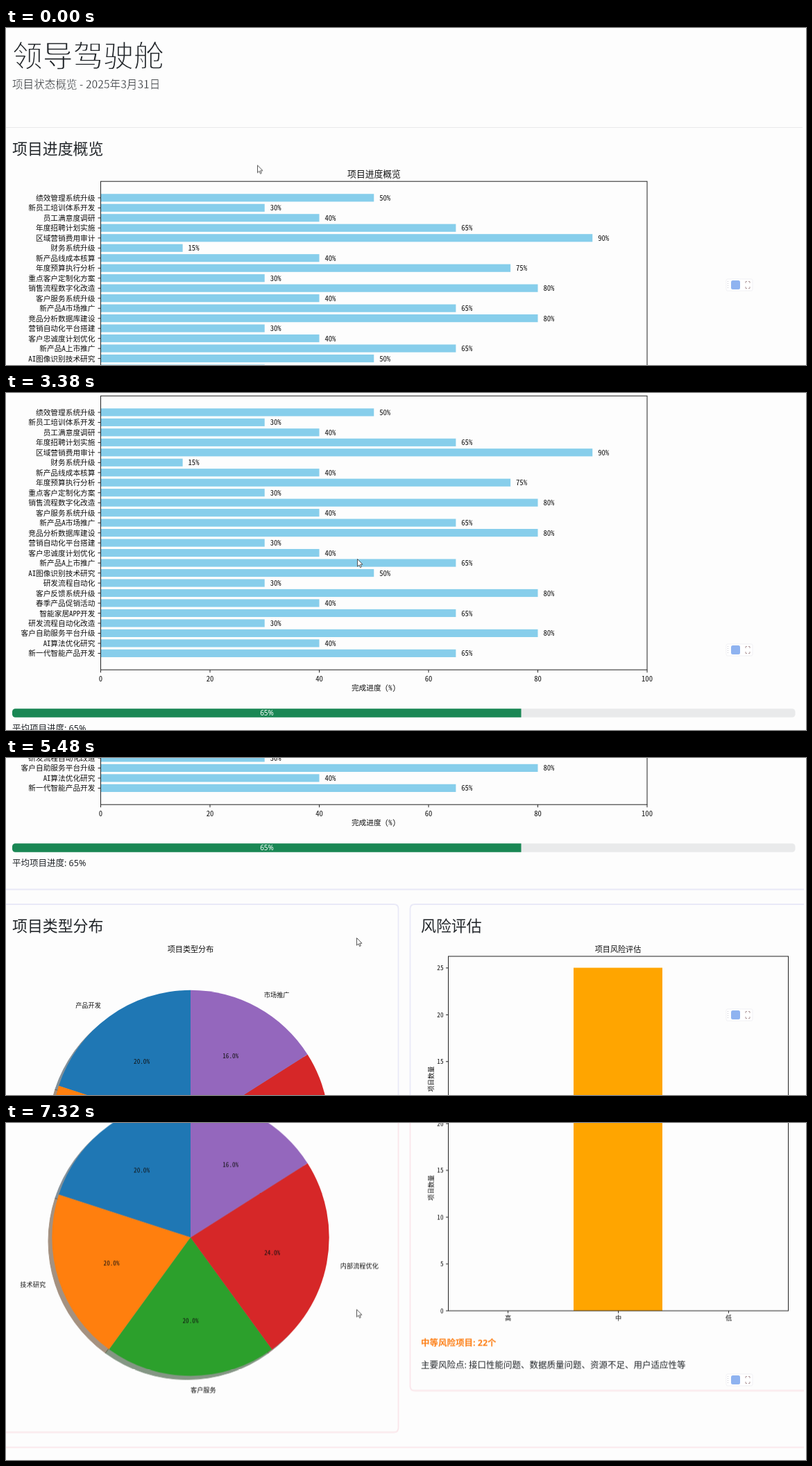
An HTML page for the animation above (8000 ms loop, 1153 by 486 pixels).

```html
<!DOCTYPE html>
<html lang="zh-CN">
<head>
<meta charset="utf-8">
<title>领导驾驶舱</title>
<style>
  html, body { margin: 0; width: 100%; height: 100%; overflow: hidden; background: #fdfdfd; }
  svg { display: block; position: absolute; left: 0; top: 0; }
  text { font-family: "Noto Sans CJK SC", "Noto Sans CJK", sans-serif; fill: #212529; }
  .plot text { font-family: "Noto Sans Mono CJK SC", "Noto Sans CJK SC", "Noto Sans CJK", monospace; fill: #111; }
  .body { font-family: "Noto Sans", "Noto Sans CJK SC", "Noto Sans CJK", sans-serif; font-size: 12.5px; }
  .head { font-size: 21.9px; }
  /* a background-coloured outline thins the strokes */
  .light { font-weight: 300; stroke: #fdfdfd; }
  .axis { fill: none; stroke: #222; stroke-width: 1; }
  .card { fill: none; stroke: #e9e9f7; stroke-width: 1.8; animation: tint 8s step-end infinite; }
  #page { animation: scroll 8s step-end infinite; }
  #cursor { animation: point 8s step-end infinite; }

  @keyframes scroll {
    0% { transform: translateY(0); }
    15.125% { transform: translateY(-61px); }
    18.125% { transform: translateY(-139px); }
    39.125% { transform: translateY(-195px); }
    42.25% { transform: translateY(-217px); }
    57.75% { transform: translateY(-250px); }
    61.875% { transform: translateY(-436px); }
    65.625% { transform: translateY(-515px); }
    68.5% { transform: translateY(-549px); }
    71.25% { transform: translateY(-607px); }
    79.875% { transform: translateY(-670px); }
    82.75% { transform: translateY(-744px); }
    85.5% { transform: translateY(-820px); }
    88.5% { transform: translateY(-900px); }
    91.5%, 100% { transform: translateY(-918.5px); }
  }
  @keyframes point {
    0% { transform: translate(362px, 197.5px); }
    11.375% { transform: translate(489px, 217px); }
    15.125% { transform: translate(507.5px, 226px); }
    39.125% { transform: translate(506px, 239px); }
    57.75% { transform: translate(506px, 245px); }
    61.875% { transform: translate(506px, 251px); }
    65.625% { transform: translate(505.5px, 255px); }
    68.5% { transform: translate(505px, 259px); }
    79.875% { transform: translate(505px, 262px); }
    82.75% { transform: translate(505px, 263px); }
    88.5% { transform: translate(505px, 266px); }
    91.5%, 100% { transform: translate(505px, 268.5px); }
  }
  @keyframes tint {
    0% { stroke: #e9e9f7; }
    91.5%, 100% { stroke: #fae6ea; }
  }
</style>
</head>
<body>
<svg width="1153" height="486" viewBox="0 0 1153 486">
  <g id="page">
    <text class="light" x="9" y="40" dy=".37em" font-size="43.75" stroke-width="1.3">领导驾驶舱</text>
    <text class="light" x="9" y="81.5" dy=".37em" font-size="15.6" stroke-width=".4">项目状态概览 - 2025年3月31日</text>
    <path d="M0 143.5H1148" stroke="#e9e9ea"/>
    <text class="head" x="9" y="173.5" dy=".37em">项目进度概览</text>
    <g id="progress" class="plot"></g>

    <rect x="9" y="672.3" width="1128.5" height="12.4" rx="4.5" fill="#e9eaeb"/>
    <path d="M742.5 672.3H13.5a4.5 4.5 0 0 0 -4.5 4.5v3.4a4.5 4.5 0 0 0 4.5 4.5H742.5z" fill="#198754"/>
    <text class="body" x="376" y="678.5" dy=".36em" text-anchor="middle" style="font-size:10px;fill:#fff">65%</text>
    <text class="body" x="9" y="700.5" dy=".37em">平均项目进度: 65%</text>

    <path class="card" d="M0 738.5H1150"/>
    <path class="card" d="M0 760H559q6.5 0 6.5 6.5V1358q0 6.5 -6.5 6.5H0"/>
    <path class="card" d="M1150 760H589q-6.5 0 -6.5 6.5V1298q0 6.5 6.5 6.5H1150"/>
    <path class="card" d="M0 1386.5H1150"/>

    <text class="head" x="9" y="791" dy=".37em">项目类型分布</text>
    <g id="types" class="plot"></g>

    <text class="head" x="598" y="791" dy=".37em">风险评估</text>
    <g id="risk" class="plot"></g>
    <text class="body" x="598" y="1235.5" dy=".37em" style="font-weight:700;fill:#fd7e14">中等风险项目: 22个</text>
    <text class="body" x="598" y="1267" dy=".37em">主要风险点: 接口性能问题、数据质量问题、资源不足、用户适应性等</text>
  </g>

  <g id="toolbar">
    <rect x="1038" y="362" width="38" height="17" rx="2" fill="#fff" stroke="#f1f1f4"/>
    <path d="M1040.5 365V377" stroke="#c9c9d2" stroke-dasharray="1 2"/>
    <rect x="1045" y="364" width="13" height="13" rx="2.5" fill="#8fb3f0"/>
    <path d="M1066 368v-2.5h2M1070 365.5h2v2.5M1066 373v2.5h2M1070 375.5h2v-2.5" fill="none" stroke="#b09a9c"/>
  </g>
  <path id="cursor" d="M.5 .5V11.2L3 8.9L4.6 12.6L6.3 11.8L4.7 8.2H8z" fill="#fff" stroke="#444" stroke-width=".9"/>
</svg>

<script>
  const fill = (id, parts) => { document.getElementById(id).innerHTML = parts.join(''); };
  const label = (s, x, y, size, anchor = 'middle', extra = '') =>
    `<text x="${x}" y="${y}" dy=".37em" font-size="${size}" text-anchor="${anchor}" ${extra}>${s}</text>`;
  const box = (x, y, w, h, attrs) => `<rect x="${x}" y="${y}" width="${w}" height="${h}" ${attrs}/>`;
  const line = d => `<path class="axis" d="${d}"/>`;

  function progressChart() {
    const rows = [
      ['绩效管理系统升级', 50], ['新员工培训体系开发', 30], ['员工满意度调研', 40],
      ['年度招聘计划实施', 65], ['区域营销费用审计', 90], ['财务系统升级', 15],
      ['新产品线成本核算', 40], ['年度预算执行分析', 75], ['重点客户定制化方案', 30],
      ['销售流程数字化改造', 80], ['客户服务系统升级', 40], ['新产品A市场推广', 65],
      ['竞品分析数据库建设', 80], ['营销自动化平台搭建', 30], ['客户忠诚度计划优化', 40],
      ['新产品A上市推广', 65], ['AI图像识别技术研究', 50], ['研发流程自动化', 30],
      ['客户反馈系统升级', 80], ['春季产品促销活动', 40], ['智能家居APP开发', 65],
      ['研发流程自动化改造', 30], ['客户自助服务平台升级', 80], ['AI算法优化研究', 40],
      ['新一代智能产品开发', 65]
    ];
    const left = 136.5, top = 221.2, unit = 7.875, pitch = 14.48, size = 10.7, height = 395;
    const bottom = top + height;
    const out = [label('项目进度概览', 530.5, 210, 12.8)];
    rows.forEach(([name, value], i) => {
      const y = top + (i + 1.64) * pitch;
      out.push(
        box(left, y - 5.7, value * unit, 11.2, 'fill="#87ceeb"'),
        line(`M${left - 4} ${y}h4`),
        label(name, 128.5, y, size, 'end'),
        label(value + '%', left + (value + 1) * unit, y, size, 'start'));
    });
    for (let v = 0; v <= 100; v += 20) {
      const x = left + v * unit;
      out.push(line(`M${x} ${bottom}v4`), label(v, x, 629, size));
    }
    out.push(box(left, top, 100 * unit, height, 'class="axis"'), label('完成进度 (%)', 530, 642.5, size));
    fill('progress', out);
  }

  function typePie() {
    const slices = [
      ['产品开发', 20, [31, 119, 180]], ['技术研究', 20, [255, 127, 14]],
      ['客户服务', 20, [44, 160, 44]], ['内部流程优化', 24, [214, 39, 40]],
      ['市场推广', 16, [148, 103, 189]]
    ];
    const cx = 266, cy = 1083.5, r = 199.7, size = 9.2;
    const at = (turn, k) => {
      const a = (0.25 + turn) * 2 * Math.PI;
      return [cx + k * r * Math.cos(a), cy - k * r * Math.sin(a)];
    };
    const shadows = [], wedges = [], words = [label('项目类型分布', cx, 825, 11.1)];
    let turn = 0;
    for (const [name, share, rgb] of slices) {
      const end = turn + share / 100, mid = (turn + end) / 2;
      const d = `M${cx} ${cy}L${at(turn, 1)}A${r} ${r} 0 0 0 ${at(end, 1)}z`;
      const dark = `rgb(${rgb.map(c => Math.round(c * 0.3))})`;
      shadows.push(`<path d="${d}" fill="${dark}" stroke="${dark}" opacity=".5"/>`);
      wedges.push(`<path d="${d}" fill="rgb(${rgb})"/>`);
      const [x, y] = at(mid, 1.1);
      words.push(
        label(name, x, y, size, x < cx - 1 ? 'end' : 'start'),
        label(share.toFixed(1) + '%', ...at(mid, 0.6), size));
      turn = end;
    }
    fill('types', ['<g transform="translate(-5.3 5.3)">', ...shadows, '</g>', ...wedges, ...words]);
  }

  function riskChart() {
    const left = 637.5, top = 835, width = 490, bottom = 1189.3, size = 9.2;
    const out = [
      label('项目风险评估', 882, 825, 11.1),
      box(818, 851.5, 128, bottom - 851.5, 'fill="#ffa500"'),
      label('项目数量', 613, 1012, size, 'middle', 'transform="rotate(-90 613 1012)"')
    ];
    for (let v = 0; v <= 25; v += 5) {
      const y = bottom - v * 13.5;
      out.push(line(`M${left - 3.5} ${y}h3.5`), label(v, 630.5, y, size, 'end'));
    }
    ['高', '中', '低'].forEach((name, i) => {
      const x = 723.5 + i * 159;
      out.push(line(`M${x} ${bottom}v3.5`), label(name, x, 1199.5, size));
    });
    out.push(box(left, top, width, bottom - top, 'class="axis"'));
    fill('risk', out);
  }

  progressChart();
  typePie();
  riskChart();
</script>
</body>
</html>
```
